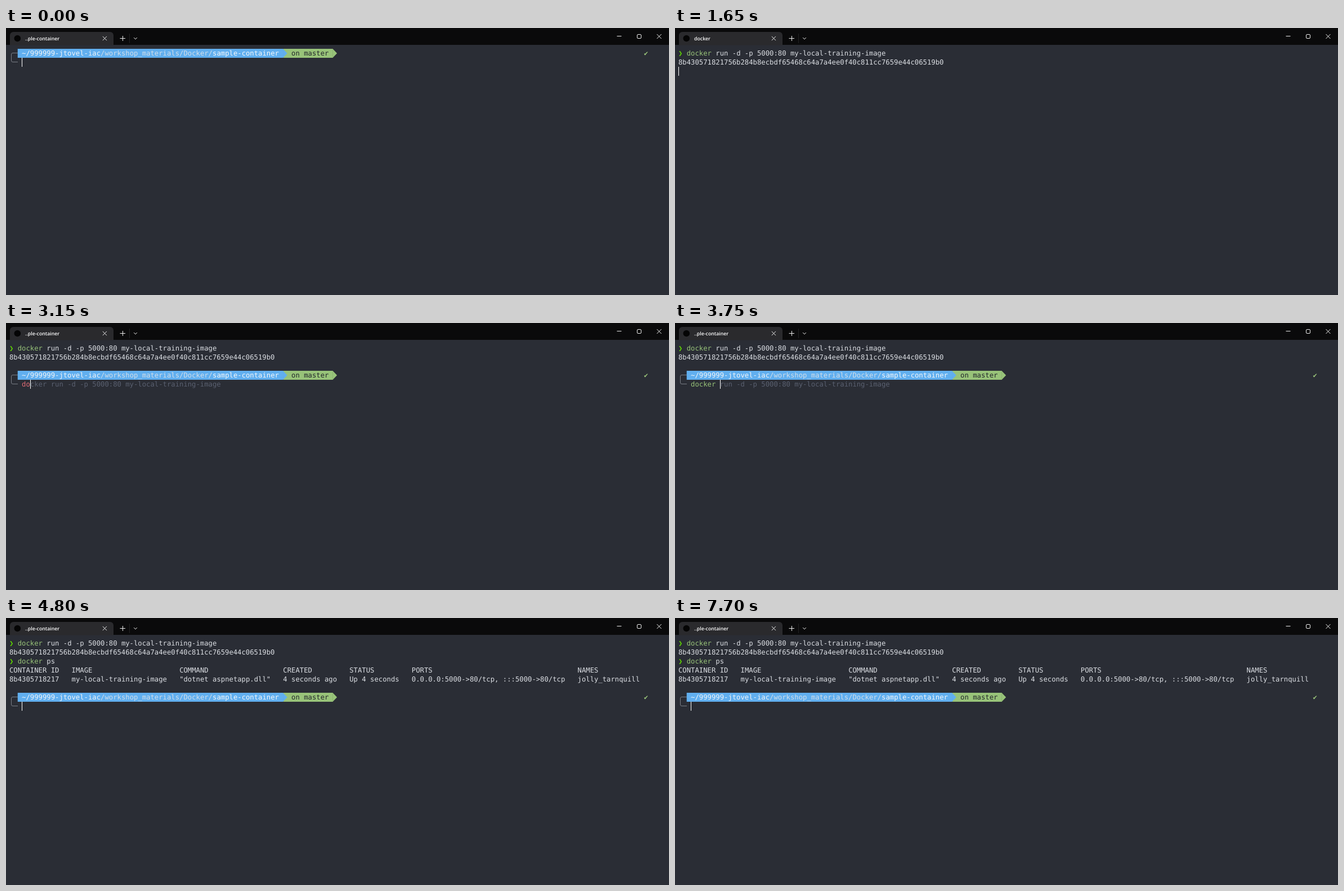
Recreate the animation shown at these times as an HTML page with a canvas. Size 1178 by 475 pixels, loop 8 s.

```html
<!DOCTYPE html>
<html lang="en">
<head>
<meta charset="utf-8">
<title>Terminal</title>
<style>
html, body { margin: 0; width: 100%; height: 100%; overflow: hidden; background: #2a2d35; }
canvas, #text { position: absolute; left: 0; top: 0; width: 1178px; height: 475px; }
#text { overflow: hidden; text-rendering: geometricPrecision; }
#text span { position: absolute; white-space: pre; font: 12.24px/16px "DejaVu Sans Mono", monospace; }
#text .tab { font: 600 8.75px/12px "Open Sans", sans-serif; }
</style>
</head>
<body>
<canvas id="stage" width="1178" height="475"></canvas>
<div id="text"></div>
<script>
const LOOP = 8000, CELL = 7.369, ROW = 16, LEFT = 6, TOP = 37;
const BG = '#2a2d35', FG = '#dcdfe4', BLUE = '#61afef', GREEN = '#98c379',
      RED = '#e06c75', DIM = '#5a6070', FRAME = '#7a7e86';
const RUN = 'docker run -d -p 5000:80 my-local-training-image';
const PS = 'docker ps';
const ID = '8b430571821756b284b8ecbdf65468c64a7a4ee0f40c811cc7659e44c06519b0';
const STOPS = [0, 15, 41, 66, 82, 97, 137];
const HEAD = ['CONTAINER ID', 'IMAGE', 'COMMAND', 'CREATED', 'STATUS', 'PORTS', 'NAMES'];
const INFO = [ID.slice(0, 12), 'my-local-training-image', '"dotnet aspnetapp.dll"', '4 seconds ago',
  'Up 4 seconds', '0.0.0.0:5000->80/tcp, :::5000->80/tcp', 'jolly_tarnquill'];
// Key press times for "docker ps"
const KEYS = [3000, 3150, 3300, 3450, 3500, 3600, 3750, 4050, 4150];
// Every moment at which the picture changes
const CUES = [0, 950, 1550, 1650, 1900, 2100, ...KEYS, 4600, 4650, 4700, 4750, 4800];

const c = document.getElementById('stage').getContext('2d');
const layer = document.getElementById('text');
const colX = col => LEFT + col * CELL;
const rowY = row => TOP + row * ROW;

function label(x, y, str, color, cls = '') {
  const el = document.createElement('span');
  el.textContent = str;
  el.className = cls;
  el.style.cssText = `left:${x}px;top:${y}px;color:${color}`;
  layer.append(el);
}

// Writes pairs of text and colour one after another on the cell grid
function put(col, row, ...parts) {
  for (let i = 0; i < parts.length; i += 2) {
    label(colX(col), rowY(row), parts[i], parts[i + 1]);
    col += parts[i].length;
  }
}

function box(x, y, w, h, color) {
  c.fillStyle = color;
  c.fillRect(x, y, w, h);
}

function line(color, width, ...pts) {
  c.strokeStyle = color;
  c.lineWidth = width;
  c.beginPath();
  for (let i = 0; i < pts.length; i += 2) c.lineTo(pts[i], pts[i + 1]);
  c.stroke();
}

function cross(x, y, r) {
  line('#eee', 1, x - r, y - r, x + r, y + r);
  line('#eee', 1, x - r, y + r, x + r, y - r);
}

function titleBar(title) {
  box(0, 0, 1178, 30, '#0a0a0b');
  c.fillStyle = '#2a2a2d';
  c.beginPath();
  c.roundRect(7, 7, 184, 23.5, [6, 6, 0, 0]);
  c.fill();
  c.fillStyle = '#050505';
  c.beginPath();
  c.arc(20.3, 18.5, 5.8, 0, Math.PI * 2);
  c.fill();
  label(34, 12.5, title, '#fff', 'tab');
  cross(175.4, 18.5, 3.6);
  line('#eee', 1, 202.5, 18.5, 212, 18.5);
  line('#eee', 1, 207.5, 14, 207.5, 23);
  line('#222224', 1, 219.5, 10, 219.5, 27);
  line('#ddd', 1, 227, 17, 230, 20, 233, 17);
  line('#eee', 1, 1085.5, 14.5, 1093.5, 14.5);
  c.strokeStyle = '#eee';
  c.beginPath();
  c.roundRect(1121.5, 11.5, 7, 7, 1.5);
  c.stroke();
  cross(1160.5, 15, 4);
}

function arrow(col, y, color) {
  c.fillStyle = color;
  c.beginPath();
  c.moveTo(colX(col) - 0.3, y);
  c.lineTo(colX(col + 1), y + ROW / 2);
  c.lineTo(colX(col) - 0.3, y + ROW);
  c.fill();
}

function prompt(row) {
  const y = rowY(row), start = colX(2);
  c.strokeStyle = FRAME;
  c.lineWidth = 1;
  c.beginPath();
  c.moveTo(21, y + 7.5);
  c.arcTo(9.5, y + 7.5, 9.5, y + 12, 2.5);
  c.arcTo(9.5, y + 23.5, 21, y + 23.5, 2.5);
  c.lineTo(21, y + 23.5);
  c.stroke();
  box(colX(66), y, colX(78) - colX(66), ROW, GREEN);
  box(start, y, colX(66) - start, ROW, BLUE);
  arrow(66, y, BLUE);
  arrow(78, y, GREEN);
  put(3, row, '~/999999-jtovel-iac', '#f2f5f8', '/workshop_materials/Docker/', '#d3dee9',
    'sample-container', '#f6f8fa');
  put(68, row, 'on master', '#23282c');
  put(153, row, '✔', GREEN);
}

function cursor(col, row) {
  box(Math.round(colX(col)), rowY(row), 1, ROW, '#fff');
}

function entered(row, cmd) {
  put(0, row, '❯', '#5fd700');
  put(2, row, 'docker', GREEN, cmd.slice(6), FG);
}

function typing(row, typed) {
  const hint = (RUN.startsWith(typed) ? RUN : PS + ' -a').slice(typed.length);
  const name = typed.slice(0, 6);
  put(3, row, name, name === 'docker' ? GREEN : RED, typed.slice(6), FG, typed ? hint : '', DIM);
  cursor(3 + typed.length, row);
}

function firstPrompt(t) {
  prompt(0);
  if (t < 950) return cursor(3, 1);
  box(colX(3), rowY(1), RUN.length * CELL, ROW, FG);
  put(3, 1, RUN, '#282c34');
  cursor(3 + RUN.length, 1);
}

function psOutput(t) {
  entered(2, PS);
  if (t < 4700) return cursor(0, 3);
  STOPS.forEach((col, i) => {
    put(col, 3, HEAD[i], FG);
    put(col, 4, INFO[i], FG);
  });
  if (t < 4800) return cursor(0, 5);
  prompt(6);
  cursor(3, 7);
}

function draw(t) {
  layer.textContent = '';
  box(0, 0, 1178, 475, BG);
  const busy = (t >= 1550 && t < 1900) || (t >= 4600 && t < 4750);
  titleBar(busy ? 'docker' : '..ple-container');
  if (t < 1550) return firstPrompt(t);
  entered(0, RUN);
  if (t < 1650) return cursor(0, 1);
  put(0, 1, ID, FG);
  if (t < 2100) return cursor(0, 2);
  if (t >= 4650) return psOutput(t);
  prompt(3);
  typing(4, PS.slice(0, KEYS.filter(k => k <= t).length));
}

let shown = -1;
function tick() {
  const t = performance.now() % LOOP;
  const cue = CUES.filter(k => k <= t).pop();
  if (cue !== shown) draw(shown = cue);
  requestAnimationFrame(tick);
}
tick();
</script>
</body>
</html>
```
